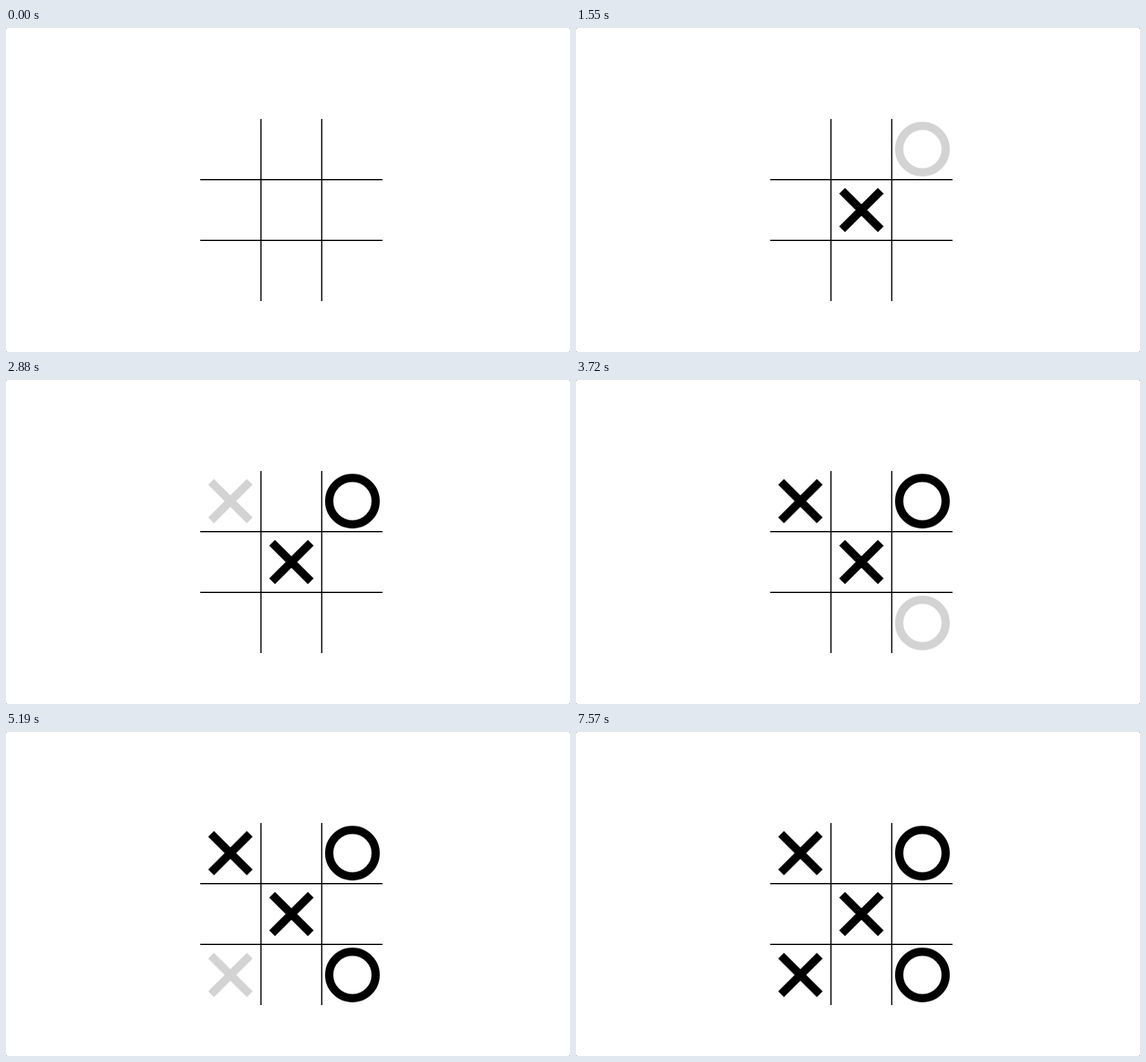
These frames come from a looping animation (928x534 px, 8 s). An HTML page:

```html
<!DOCTYPE html>
<html lang="en">
<head>
<meta charset="utf-8">
<title>Noughts and crosses</title>
<style>
  html, body { margin: 0; width: 100%; height: 100%; overflow: hidden; background: #444; }
  svg { display: block; width: 928px; height: 534px; background: #fff; border-radius: 2px; }
  .grid { stroke: #000; stroke-width: 2; }
  .mark { fill: none; stroke-width: 13.5; opacity: 0; }
</style>
</head>
<body>
<svg id="board" viewBox="0 0 928 534">
  <path class="grid" d="M419.5 150V450M519.5 150V450M319.5 250H619.5M319.5 350H619.5"/>
</svg>
<script>
const LOOP = 8000;
const CENTER = { x: 469.6, y: 300 };
const PITCH = 100.4;
const ARM = 45 / Math.SQRT2;
const RING = 38.25;

const SHAPES = {
  X: `M${-ARM} ${-ARM}L${ARM} ${ARM}M${ARM} ${-ARM}L${-ARM} ${ARM}`,
  O: `M${-RING} 0A${RING} ${RING} 0 1 1 ${RING} 0A${RING} ${RING} 0 1 1 ${-RING} 0Z`
};

const STATES = {
  none: { opacity: 0, stroke: '#d3d3d3' },
  hover: { opacity: 1, stroke: '#d3d3d3' },
  placed: { opacity: 1, stroke: '#000' }
};

// Each mark: shape, column, row, then [time in ms, state] steps.
const MARKS = [
  ['X', 1, 1, [500, 'hover'], [1270, 'placed']],
  ['O', 2, 0, [1550, 'hover'], [2320, 'placed']],
  ['X', 1, 0, [2530, 'hover'], [2600, 'none']],
  ['X', 0, 0, [2600, 'hover'], [2670, 'none'], [2880, 'hover'], [3440, 'placed']],
  ['X', 0, 1, [2670, 'hover'], [2880, 'none']],
  ['O', 2, 2, [3720, 'hover'], [4910, 'placed']],
  ['X', 1, 2, [5050, 'hover'], [5190, 'none']],
  ['X', 0, 2, [5190, 'hover'], [6380, 'placed']],
  ['O', 2, 1, [6940, 'hover'], [7570, 'none']]
];

function addMark([shape, column, row, ...steps]) {
  const mark = document.createElementNS('http://www.w3.org/2000/svg', 'path');
  const x = CENTER.x + (column - 1) * PITCH;
  const y = CENTER.y + (row - 1) * PITCH;
  mark.setAttribute('class', 'mark');
  mark.setAttribute('d', SHAPES[shape]);
  mark.setAttribute('transform', `translate(${x} ${y})`);
  document.getElementById('board').append(mark);

  const last = steps[steps.length - 1][1];
  const frames = [[0, 'none'], ...steps, [LOOP, last]].map(([time, state]) => ({
    ...STATES[state], offset: time / LOOP, easing: 'step-end'
  }));
  mark.animate(frames, { duration: LOOP, iterations: Infinity });
}

MARKS.forEach(addMark);
</script>
</body>
</html>
```
